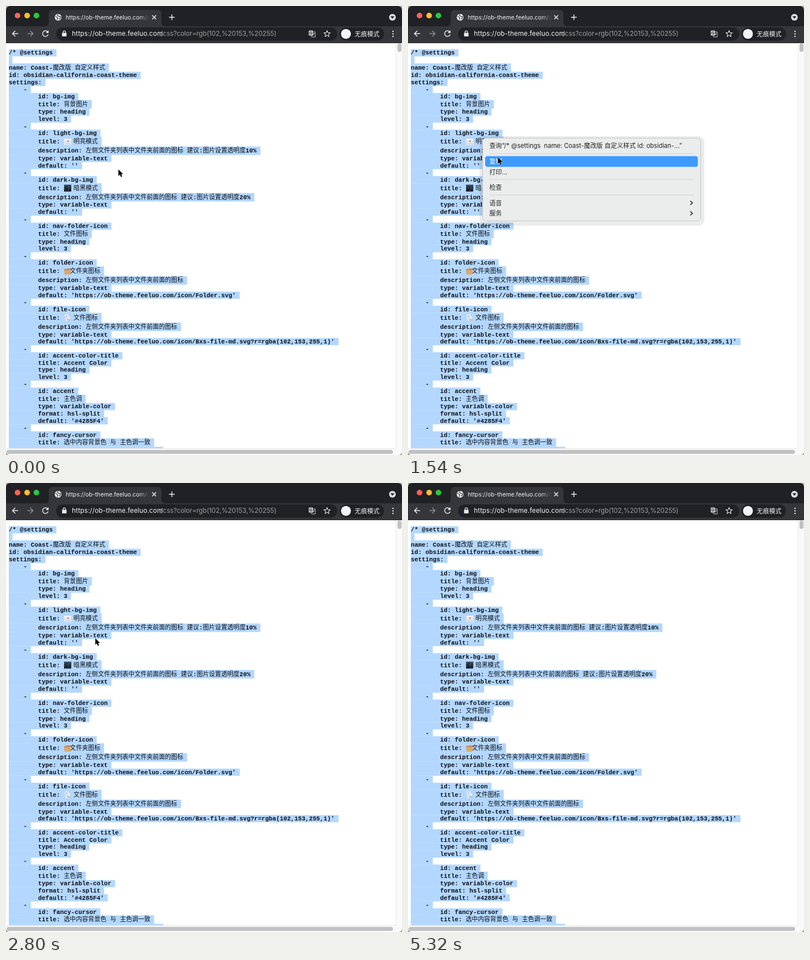
Recreate the animation shown at these times as an HTML page. Size 703 px wide and 797 px high, loop 5600 ms.

```html
<!DOCTYPE html>
<html lang="zh-CN">
<head>
<meta charset="utf-8">
<title>Theme CSS</title>
<style>
  html, body { margin: 0; width: 100%; height: 100%; overflow: hidden; background: #a9a595; }
  svg { display: block; width: 100vw; height: 100vh; }
  text { white-space: pre; }
  .ui { font-family: Inter, "Noto Sans CJK SC", "Noto Sans CJK", sans-serif; }
  .code { font: 700 10.84px "Liberation Mono", "Noto Sans CJK SC", "Noto Sans CJK", monospace; fill: #0b0f14; }
  .code .han { font-family: "Noto Sans CJK SC", "Noto Sans CJK", sans-serif; font-weight: 400; }
  .line { fill: none; stroke: #e8eaed; stroke-width: 1.5; }
</style>
</head>
<body>
<svg viewBox="0 0 703 797">
  <defs>
    <clipPath id="window"><rect width="703" height="797" rx="7"/></clipPath>
    <clipPath id="page"><rect y="66" width="692" height="719.5"/></clipPath>
    <linearGradient id="fade" gradientUnits="userSpaceOnUse" x1="236" x2="252" y1="0" y2="0">
      <stop offset="0" stop-color="#f1f3f4"/><stop offset="1" stop-color="#f1f3f4" stop-opacity=".1"/>
    </linearGradient>
  </defs>
  <g clip-path="url(#window)">
    <rect width="703" height="797" fill="#fff"/>

    <!-- Tab strip and toolbar -->
    <rect width="703" height="66" fill="#202124"/>
    <path d="M69 36Q76 36 76 29V14Q76 7 83 7H269Q276 7 276 14V29Q276 36 283 36H703V65.5H0V36Z" fill="#35363a"/>
    <circle cx="20.5" cy="17" r="5" fill="#ff5f57"/>
    <circle cx="37.5" cy="17" r="5" fill="#febc2e"/>
    <circle cx="54" cy="17" r="5" fill="#28c840"/>
    <circle cx="92.5" cy="20" r="6" fill="#f1f3f4"/>
    <path d="M87.5 18.5l3.5 1.5 1 2-1.5 2.5M92 14.5l-.5 2.5 2.5 1.5 3 .5-1 3-2 1.5" fill="none" stroke="#35363a" stroke-width="1.3"/>
    <text class="ui" x="106" y="23.7" font-size="10.3" fill="url(#fade)">https://ob-theme.feeluo.com/c</text>
    <path class="line" d="M259.5 16.5l7 7m0-7l-7 7M289.500 20h10m-5-5v10"/>
    <circle cx="686" cy="20" r="6" fill="#dadce0"/>
    <path d="M682.5 18.2h7l-3.5 4.3z" fill="#202124"/>

    <path class="line" d="M21.5 49h-10m5-5l-5 5 5 5"/>
    <path class="line" d="M38 49h10m-5-5l5 5-5 5" style="stroke:#8a8b8e"/>
    <path class="line" d="M74 46a5 5 0 1 0 .8 4.5"/>
    <path d="M75.5 43v5h-5z" fill="#e8eaed"/>
    <rect x="89" y="38" width="499" height="23.5" rx="11.7" fill="#202124"/>
    <rect x="99.5" y="47.5" width="8" height="6.5" rx="1" fill="#e8eaed"/>
    <path class="line" d="M101.3 48v-1.7a2.2 2.2 0 0 1 4.4 0V48" style="stroke-width:1.2"/>
    <text class="ui" x="117" y="53.2" font-size="11.7" letter-spacing=".1" fill="#f1f3f4">https://ob-theme.feeluo.com</text>
    <text class="ui" x="274.5" y="53.2" font-size="11.7" letter-spacing="-.12" fill="#9aa0a6">/css?color=rgb(102,%20153,%20255)</text>
    <rect x="537.5" y="43.5" width="7.5" height="9" rx="1" fill="#c4c7ca"/>
    <path class="line" d="M545 46h4v9h-6.5l-1-2.5M545 49h3m-1.5 0q-.3 2-2 3.5" style="stroke:#c4c7ca;stroke-width:1"/>
    <path d="M543 47a2 2 0 1 0 .2 1.2h-1.7" fill="none" stroke="#202124"/>
    <path class="line" d="M570 43.7l1.6 3.5 3.9.4-2.9 2.6.8 3.9-3.4-2-3.4 2 .8-3.9-2.9-2.6 3.9-.4z" style="stroke-width:1.1"/>
    <rect x="592" y="38" width="79" height="23.5" rx="11.7" fill="#202124"/>
    <circle cx="603.5" cy="49.5" r="8.8" fill="#f1f3f4"/>
    <text class="ui" x="619" y="53.5" font-size="11" font-weight="500" fill="#f1f3f4">无痕模式</text>
    <path d="M687 45v.01m0 4.49v.01m0 4.49v.01" stroke="#e8eaed" stroke-width="2.4" stroke-linecap="round"/>

    <g id="code" clip-path="url(#page)"></g>

    <!-- Scrollbars -->
    <path d="M692 66h11v731H0V785.5h692z" fill="#fafafa"/>
    <path d="M692.5 66v719.5H0" fill="none" stroke="#e6e6e6"/>
    <rect x="695" y="66.5" width="7" height="15" rx="3.5" fill="#c1c1c1"/>
    <rect x="1" y="788" width="686" height="7" rx="3.5" fill="#c1c1c1"/>

    <g id="menu" class="ui" font-size="11.1">
      <rect x="127" y="231" width="399" height="159" rx="10" fill="#000" opacity=".075"/>
      <rect x="132.5" y="234.5" width="387" height="147" rx="6" fill="#ebeded" stroke="#c3c5c6"/>
      <path d="M145 262h363M145 308h363M145 335.5h363" stroke="#d0d2d2"/>
      <path d="M501 346l4 3.5-4 3.5M501 364.5l4 3.5-4 3.5" fill="none" stroke="#222" stroke-width="1.6"/>
      <rect id="hot" x="137" width="377.5" height="19" rx="4" fill="#3d9aff"/>
    </g>
    <path id="cursor" d="M0 0V11.8L2.7 9.3 4.5 13.4 6.7 12.4 4.9 8.5H8.5Z" fill="#000" stroke="#fff" stroke-width="1" paint-order="stroke"/>
  </g>
</svg>
<script>
const LOOP = 5600, TICK = 70;
const LEFT = 5, EM = 10.84, CELL = EM * 0.6;
const HAN = /[\u3000-\u9fff]/;
const $ = id => document.getElementById(id);

function add(parent, tag, attrs, text) {
  const el = document.createElementNS('http://www.w3.org/2000/svg', tag);
  for (const key in attrs) el.setAttribute(key, attrs[key]);
  if (text) el.textContent = text;
  return parent.appendChild(el);
}

// An ideographic space (\u3000) reserves the place of a pictogram.
const codeLines = `/* @settings

name: Coast-魔改版 自定义样式
id: obsidian-california-coast-theme
settings:
-
id: bg-img
title: 背景图片
type: heading
level: 3
-
id: light-bg-img
title: \u3000 明亮模式
description: 左侧文件夹列表中文件夹前面的图标 建议:图片设置透明度10%
type: variable-text
default: ''
-
id: dark-bg-img
title: \u3000 暗黑模式
description: 左侧文件夹列表中文件前面的图标 建议:图片设置透明度20%
type: variable-text
default: ''
-
id: nav-folder-icon
title: 文件图标
type: heading
level: 3
-
id: folder-icon
title: \u3000文件夹图标
description: 左侧文件夹列表中文件夹前面的图标
type: variable-text
default: 'https://ob-theme.feeluo.com/icon/Folder.svg'
-
id: file-icon
title: \u3000 文件图标
description: 左侧文件夹列表中文件前面的图标
type: variable-text
default: 'https://ob-theme.feeluo.com/icon/Bxs-file-md.svg?r=rgba(102,153,255,1)'
-
id: accent-color-title
title: Accent Color
type: heading
level: 3
-
id: accent
title: 主色调
type: variable-color
format: hsl-split
default: '#4285F4'
-
id: fancy-cursor
title: 选中内容背景色 与 主色调一致`.split('\n');

// Pictograms as [path, fill] layers in a 13 by 12 box.
const pictograms = [
  [['M0 1H13V12H0Z', '#e3e6ea'], ['M0 1H13V4H0Z', '#f6f3ef'], ['M5 4h4l-2 3z', '#d9684f'], ['M2 9h9v1H2z', '#c5ccd4']],
  [['M0 0H13V12H0Z', '#34465c'], ['M0 5h3V3h3v4h3V4h3v8H0z', '#17202d'], ['M1 7h1v1H1zM4 5h1v1H4zM7 9h1v1H7zM10 6h1v1h-1z', '#9db4c8']],
  [['M0 2h4l1-1h4l1 1h2v9H1z', '#c08c55'], ['M0 4h12l-1 8H1z', '#dca96f']],
  [['M1 0h6l5 8v4H3z', '#e9ebee'], ['M4 5l3 3 5 0v4H6z', '#c3c7cc'], ['M3 3h3v1H3z', '#8d949c']]
];

function buildCode() {
  const page = $('code');
  const selection = add(page, 'g', { fill: '#b3d7ff' });
  let y = 76.7, picture = 0;
  codeLines.forEach((line, i) => {
    const hasIcon = line.includes('\u3000');
    const indent = i < 5 ? 0 : line === '-' ? 4 : 8;
    const x = LEFT + indent * CELL;
    const height = hasIcon ? 17.4 : HAN.test(line) ? 14.9 : 12.55;
    const middle = y + height / 2;
    const width = [...line].reduce((sum, c) => sum + (HAN.test(c) ? EM : CELL), 0);
    add(selection, 'rect', { x: LEFT, y, width: x - LEFT + width + CELL, height: height + 0.2 });
    const text = add(page, 'text', { class: 'code', x, y: middle + 3.4 });
    for (const run of line.match(/[\u3000-\u9fff]+|[^\u3000-\u9fff]+/g) || [])
      add(text, 'tspan', HAN.test(run) ? { class: 'han' } : {}, run);
    if (hasIcon) {
      const icon = add(page, 'g', { transform: `translate(103 ${middle - 6})` });
      for (const [d, fill] of pictograms[picture++]) add(icon, 'path', { d, fill });
    }
    y += height;
  });
  add(selection, 'rect', { x: LEFT, y, width: 274, height: 15 });
}
buildCode();

const menuItems = [
  [248, '查询“/* @settings\u00a0 name: Coast-魔改版 自定义样式 id: obsidian-...”'],
  [276, '复制'], [294.5, '打印...'], [322, '检查'], [349.5, '语音'], [368, '服务']
].map(([y, label]) => ({ y, el: add($('menu'), 'text', { x: 144.5, y: y + 4 }, label) }));

// Cursor stops: time, x, y
const stops = [
  [0, 199.5, 290], [420, 136, 241.5], [1260, 136, 241.5], [1610, 160.5, 269.5],
  [2030, 160.5, 269.5], [2170, 158.5, 275.5], [3080, 158.5, 275.5],
  [3640, 133.5, 205.5], [3780, 133.5, 205.5], [4270, 141, 206], [LOOP, 141, 206]
];
const OPEN = 840, BLINK = 2450, FADE = 2520, CLOSED = 2800, GONE = 4270;
const ease = p => p * (2 - p);

function cursorAt(t) {
  const i = stops.findIndex(s => s[0] > t);
  const [t0, x0, y0] = stops[i - 1], [t1, x1, y1] = stops[i];
  const p = ease((t - t0) / (t1 - t0));
  return [x0 + (x1 - x0) * p, y0 + (y1 - y0) * p];
}

function show(el, visible) {
  el.style.display = visible ? '' : 'none';
}

function draw(time) {
  const t = Math.floor(time % LOOP / TICK) * TICK;
  const [x, y] = cursorAt(t);
  $('cursor').setAttribute('transform', `translate(${x} ${y})`);
  show($('cursor'), t < GONE);

  show($('menu'), t >= OPEN && t < CLOSED);
  $('menu').setAttribute('opacity', t < FADE ? 1 : Math.max(0, 1 - (t - FADE) / (CLOSED - FADE)));
  const lit = t > OPEN && t !== BLINK;
  const hot = lit && menuItems.find(item => Math.abs(item.y - y) < 9.5);
  show($('hot'), hot);
  if (hot) $('hot').setAttribute('y', hot.y - 9.5);
  for (const item of menuItems) item.el.setAttribute('fill', item === hot ? '#fff' : '#222');
}

const begin = performance.now();
function tick() {
  draw(performance.now() - begin);
  requestAnimationFrame(tick);
}
tick();
</script>
</body>
</html>
```
